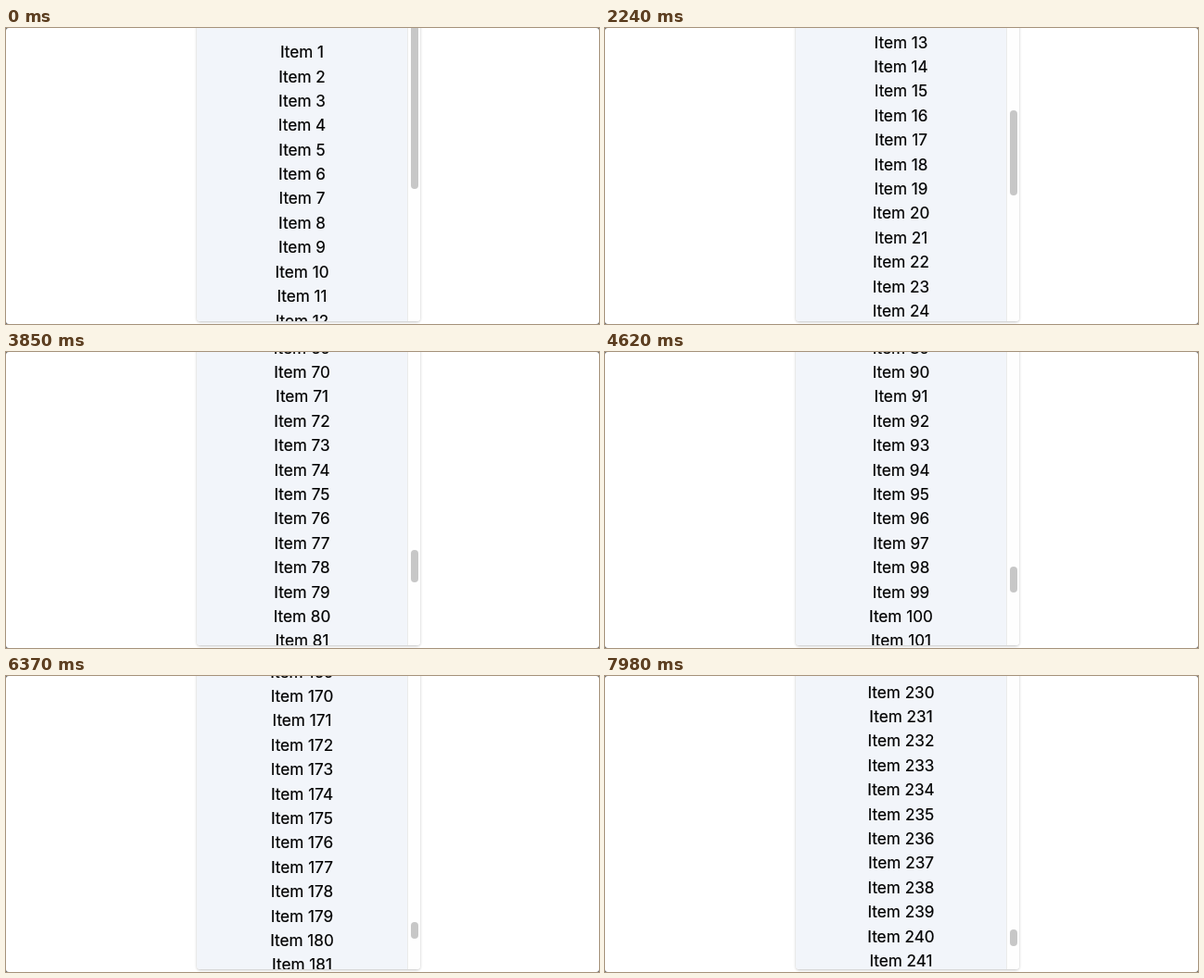
An HTML page for the animation above (8000 ms loop, 640 by 320 pixels).

```html
<!DOCTYPE html>
<html lang="en">
<head>
<meta charset="utf-8">
<title>Endless list</title>
<style>
  html, body { margin: 0; width: 100%; height: 100%; overflow: hidden; background: #666; }
  .stage { position: relative; width: 640px; height: 320px; overflow: hidden; background: #fff; border-radius: 3px; }
  .panel, .shadow { position: absolute; left: 206px; top: -11px; width: 241px; height: 328px; border-radius: 4px; }
  .panel { background: #fff; overflow: hidden; }
  .shadow { box-shadow: 0 1px 3px rgba(0, 0, 0, .24); }
  .list { position: absolute; inset: 0 14px 0 0; background: #f2f5fa; }
  .track { position: absolute; right: 0; top: 0; width: 13px; height: 100%; background: #fefefe; border-left: 1px solid #ebebeb; }
  .thumb { position: absolute; left: 3px; width: 8px; border-radius: 4px; background: #c7c7c7; }
  .row {
    position: absolute; left: 0; width: 100%; height: 26px; text-align: center; white-space: pre;
    font: 17.2px/26px Inter, "Liberation Sans", sans-serif; color: #000;
    -webkit-text-stroke: .2px #000;
  }
</style>
</head>
<body>
<div class="stage">
  <div class="shadow"></div>
  <div class="panel">
    <div class="list"></div>
    <div class="track"><div class="thumb"></div></div>
  </div>
</div>
<script>
  const LOOP = 8000, TICK = 70, PITCH = 26.4, BATCH = 20;
  const TOP = -11, VIEW = 328, FIRST = 26.1;

  // Each flick: start time, ticks, slowness of the start
  const flicks = [
    [1540, 6, 1.015], [2240, 2, 1.971], [3010, 2, 1.971], [3640, 4, 1.024],
    [4270, 3, 1.024], [4830, 2, 1.971], [5250, 4, 1.024], [5740, 3, 1.024],
    [6230, 3, 1.024], [6650, 3, 1.024], [7070, 5, 1.024], [7560, 3, 1.024],
    [7980, 5, 1.824]
  ];

  const list = document.querySelector('.list');
  const thumb = document.querySelector('.thumb');
  const rows = Array.from({ length: 15 }, () => {
    const row = document.createElement('div');
    row.className = 'row';
    return list.appendChild(row);
  });

  const maxScroll = count => Math.max(0, count * PITCH - 286.3);
  const smooth = u => u * u * (3 - 2 * u);

  // Scroll offset and number of loaded items
  function stateAt(t) {
    const i = flicks.filter(f => f[0] <= t).length - 1;
    if (i < 0) return [0, BATCH];
    const [start, ticks, slow] = flicks[i];
    const k = Math.min(ticks, Math.floor((t - start) / TICK) + 1);
    const from = maxScroll(i * BATCH), to = maxScroll((i + 1) * BATCH);
    const scroll = from + (to - from) * smooth((k / ticks) ** slow);
    return [scroll, (i + (k === ticks ? 2 : 1)) * BATCH];
  }

  function draw(t) {
    const [scroll, count] = stateAt(t);
    const first = Math.max(1, Math.floor((scroll - 30) / PITCH));
    rows.forEach((row, i) => {
      const n = first + i;
      const y = FIRST + (n - 1) * PITCH - scroll;
      row.textContent = n <= count ? 'Item ' + n : '';
      row.style.top = Math.round(y) - 13 - TOP + 'px';
    });

    const range = maxScroll(count);
    const size = Math.max(21, VIEW * VIEW / (range + VIEW));
    thumb.style.top = 2 + (VIEW - size) * scroll / range + 'px';
    thumb.style.height = Math.max(18, size - 5.5) + 'px';
  }

  const origin = performance.now();
  function frame() {
    draw((performance.now() - origin) % LOOP);
    requestAnimationFrame(frame);
  }
  frame();
</script>
</body>
</html>
```
